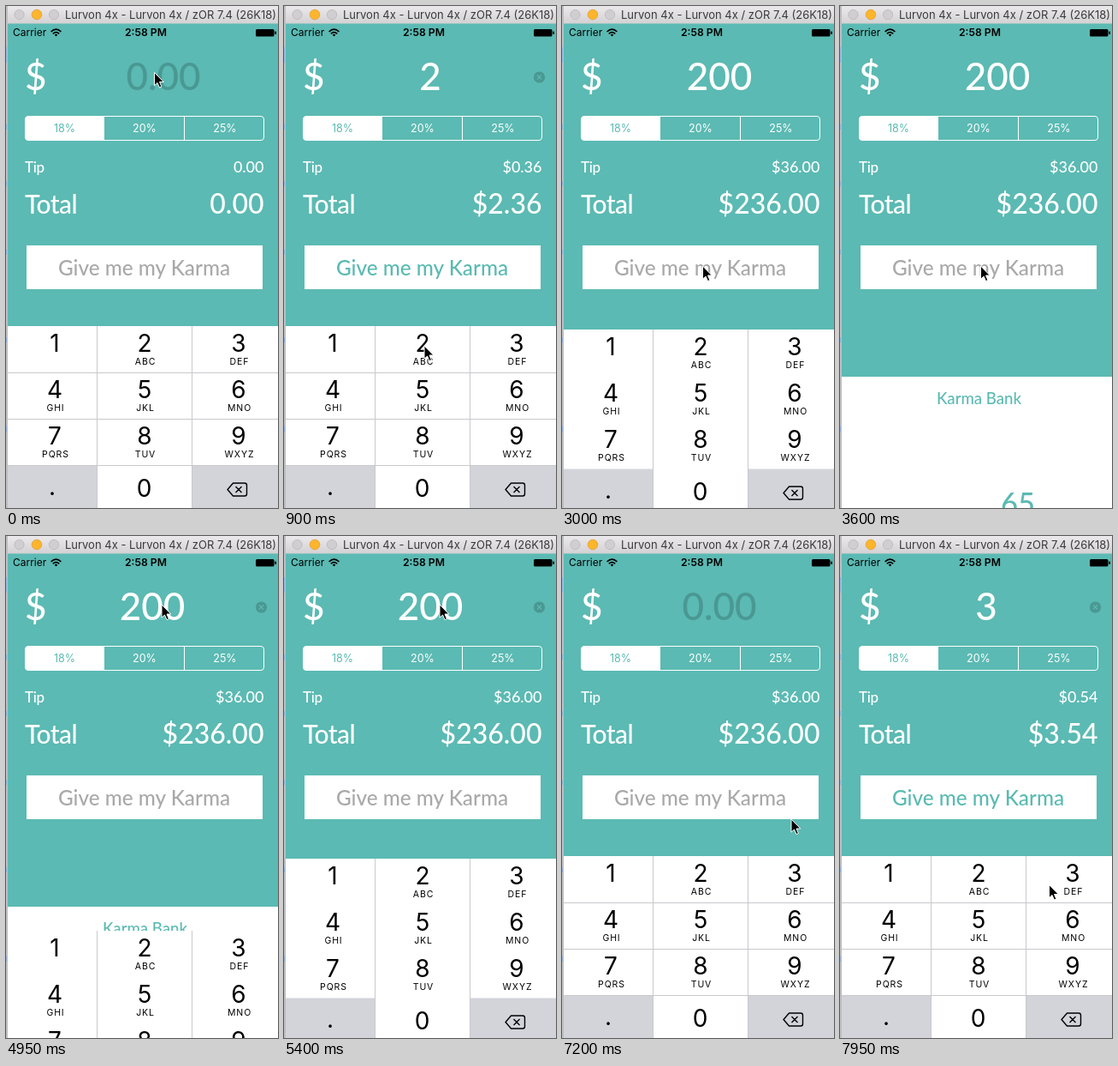
An HTML page that plays this animation: 318 by 585 pixels, repeating every 8 s.

```html
<!DOCTYPE html>
<html lang="en">
<head>
<meta charset="utf-8">
<title>Tip calculator</title>
<style>
  html, body { margin: 0; height: 100%; overflow: hidden; background: #5bbab3; }
  svg { display: block; font-family: Inter, sans-serif; }
  .geo { font-family: Lato, sans-serif; font-weight: 500; }
  .mid { text-anchor: middle; }
  .end { text-anchor: end; }
  .white { fill: #fff; }
  .teal { fill: #5bbab3; }
  .key { font-size: 28px; }
  .letters { font-size: 10.5px; letter-spacing: .9px; }
  .line { stroke: #c9c9cd; }
</style>
</head>
<body>
<svg width="318" height="585" viewBox="0 0 318 585">
  <defs>
    <linearGradient id="bar" x2="0" y2="1">
      <stop stop-color="#ebe9eb"/><stop offset="1" stop-color="#d3d1d3"/>
    </linearGradient>
  </defs>
  <rect width="318" height="585" class="teal"/>

  <!-- window title -->
  <rect width="318" height="20.5" fill="url(#bar)"/>
  <g fill="#d0ced0" stroke="#b9b7b9" stroke-width=".8">
    <circle cx="15.5" cy="10" r="5.6"/>
    <circle cx="36" cy="10" r="5.8" fill="#fdb52c" stroke="#e2a033"/>
    <circle cx="56" cy="10" r="5.6"/>
  </g>
  <text x="192.5" y="15" class="mid" font-size="13" fill="#3a3a3a">Lurvon 4x - Lurvon 4x / zOR 7.4 (26K18)</text>

  <!-- status bar -->
  <text x="8" y="35" font-size="12">Carrier</text>
  <text x="163.5" y="35" class="mid" font-size="12.2" font-weight="600">2:58 PM</text>
  <g fill="none" stroke="#000" stroke-width="1.7">
    <path d="M52.6 30Q58.5 24.4 64.4 30M54.8 32.3Q58.5 29 62.2 32.3"/>
    <path d="M56.6 33.6Q58.5 32 60.4 33.6L58.5 35.6Z" fill="#000" stroke="none"/>
  </g>
  <rect x="292" y="27" width="21.5" height="8.5" rx="1.5"/>
  <rect x="314.3" y="29.5" width="1.7" height="3.5" rx=".8"/>

  <!-- form -->
  <g class="geo white">
    <text x="22" y="98" font-size="44">$</text>
    <text x="22" y="194" font-size="17" letter-spacing="-.3">Tip</text>
    <text x="22" y="242" font-size="30" letter-spacing="-.6">Total</text>
    <text id="tip" x="301.5" y="194" class="end" font-size="18"></text>
    <text id="total" x="301.5" y="242" class="end" font-size="32"></text>
  </g>
  <text id="amount" y="98" class="geo mid" font-size="44"></text>
  <g id="clear">
    <circle cx="298.5" cy="83" r="6.6"/>
    <path d="M296 80.500l5 5m0-5l-5 5" stroke="#5bbab3" stroke-width="1.1"/>
  </g>
  <rect x="22.500" y="128.500" width="279" height="28" rx="3.500" fill="none" stroke="#fff"/>
  <path d="M115 128.500H26q-3.500 0-3.500 3.500v21q0 3.500 3.500 3.500h89z" class="white"/>
  <path d="M208.500 129v27" stroke="#fff"/>
  <g class="mid white" font-size="12.5">
    <text x="68.5" y="147" class="teal">18%</text>
    <text x="162" y="147">20%</text>
    <text x="256" y="147">25%</text>
  </g>
  <rect x="24" y="279" width="276" height="51" class="white"/>
  <text id="button" x="161.5" y="314" class="geo mid" font-size="24.3">Give me my Karma</text>

  <!-- bank panel -->
  <rect y="432" width="318" height="153" class="white"/>
  <g class="geo mid teal">
    <text x="162.5" y="464" font-size="18.6">Karma Bank</text>
    <text id="karma" font-size="34.5">65</text>
  </g>

  <g id="keyboard">
    <rect y="373" width="318" height="212" class="white"/>
    <path d="M0 535.500H106.500V585H0zM217.500 535.500H318V585H217.500z" fill="#d2d4da"/>
    <path d="M106.500 373V585M217.500 373V585" class="line"/>
    <path id="rows" d="M0 427.500H318M0 481.500H318M0 535.500H318" class="line"/>
    <g id="keys" class="mid"></g>
    <path d="M259 563.500L265.500 556H279q2.500 0 2.500 2.500v10q0 2.500-2.500 2.500H265.500ZM268.500 560l7 7m0-7l-7 7"
      fill="none" stroke="#000" stroke-width="1.4" stroke-linejoin="round"/>
  </g>

  <!-- window edge -->
  <rect width="2" height="585" fill="#bdbdc0"/>
  <path d="M.5 48v18M.5 138v6M.5 204v6M.5 284v6M.5 386v6M.5 490v6" stroke="#8fb0d8"/>

  <path id="cursor" d="M0 0V15.200L3.500 12L6 17.600L8.400 16.500L6 11H10.800Z" stroke="#fff" stroke-width="1"/>
</svg>
<script>
const LOOP = 8000, STEP = 150;
const $ = id => document.getElementById(id);

// Tracks hold [time, ...values]; values are interpolated linearly.
const cursorTrack = [
  [150, 173.5, 77.5], [300, 172, 100], [600, 166, 330], [750, 164, 395], [900, 164, 396],
  [1050, 163, 460], [1200, 161, 544], [1350, 160, 566], [1800, 161, 557.5], [2400, 161, 557.5],
  [2550, 161, 530], [2850, 164, 320], [3000, 164.5, 303], [3600, 164.5, 303],
  [3900, 168, 230], [4200, 179, 100], [4500, 182, 81], [4650, 182, 80], [5850, 182, 80],
  [6150, 240, 81], [6300, 290, 80], [6450, 301, 80], [6600, 301, 80], [6900, 296, 125],
  [7200, 268, 330], [7350, 260, 410], [7500, 256, 424], [7650, 255, 422], [7950, 244.5, 406.5]
];
const keyboardTrack = [
  [2850, 0], [3000, 4], [3150, 150], [3300, 212], [4800, 212],
  [4950, 87], [5100, 28], [5250, 9], [5400, 3], [5550, 0]
];
const typed = [[0, ''], [900, '2'], [2100, '20'], [2250, '200'], [6600, ''], [7650, '3']];

function sample(track, t) {
  const next = track.findIndex(point => point[0] > t);
  if (next === 0) return track[0].slice(1);
  if (next < 0) return track[track.length - 1].slice(1);
  const a = track[next - 1], b = track[next];
  const k = (t - a[0]) / (b[0] - a[0]);
  return a.slice(1).map((v, i) => v + (b[i + 1] - v) * k);
}

function addKey(label, x, y, cls) {
  const text = document.createElementNS('http://www.w3.org/2000/svg', 'text');
  text.setAttribute('x', x);
  text.setAttribute('y', y);
  text.setAttribute('class', cls);
  text.textContent = label;
  $('keys').append(text);
}

['', 'ABC', 'DEF', 'GHI', 'JKL', 'MNO', 'PQRS', 'TUV', 'WXYZ'].forEach((letters, i) => {
  const x = [57, 162, 272][i % 3], y = 403 + 54 * Math.floor(i / 3);
  addKey(i + 1, x, y, 'key');
  addKey(letters, x + 1, y + 15, 'letters');
});
addKey('.', 54, 570, 'key');
addKey('0', 161.5, 572, 'key');

function draw(t) {
  const entries = typed.filter(entry => entry[0] <= t).map(entry => entry[1]);
  const text = entries[entries.length - 1];
  // Clearing the field leaves the last computed sums in place.
  const bill = Number(entries.filter(Boolean).pop() || 0);
  const money = value => (bill ? '$' : '') + value.toFixed(2);
  const editing = t < 3000 || t >= 4950;
  const showClear = editing && text !== '';
  const active = (t >= 900 && t < 3000) || t >= 7650;

  $('amount').textContent = text || '0.00';
  $('amount').setAttribute('x', showClear ? 171 : 184);
  $('amount').setAttribute('fill', text ? '#fff' : '#4a9893');
  $('tip').textContent = money(bill * .18);
  $('total').textContent = money(bill * 1.18);
  $('clear').style.display = showClear ? '' : 'none';
  $('clear').setAttribute('fill', t >= 6450 && t < 6600 ? '#3d7b77' : '#4a9893');
  $('button').setAttribute('fill', active ? '#5bbab3' : '#a9a9a9');

  const [drop] = sample(keyboardTrack, t);
  $('keyboard').setAttribute('transform', `translate(0 ${drop})`);
  $('rows').style.display = drop ? 'none' : '';

  const rise = 1 - (1 - Math.min(1, Math.max(0, (t - 3600) / 900))) ** 2;
  $('karma').style.display = t < 3600 ? 'none' : '';
  $('karma').setAttribute('x', 208 - 46 * rise);
  $('karma').setAttribute('y', 592 - 57 * rise);

  $('cursor').setAttribute('transform', `translate(${sample(cursorTrack, t)})`);
}

function tick() {
  const t = performance.now() % LOOP;
  draw(Math.floor(t / STEP) * STEP);
  requestAnimationFrame(tick);
}
tick();
</script>
</body>
</html>
```
